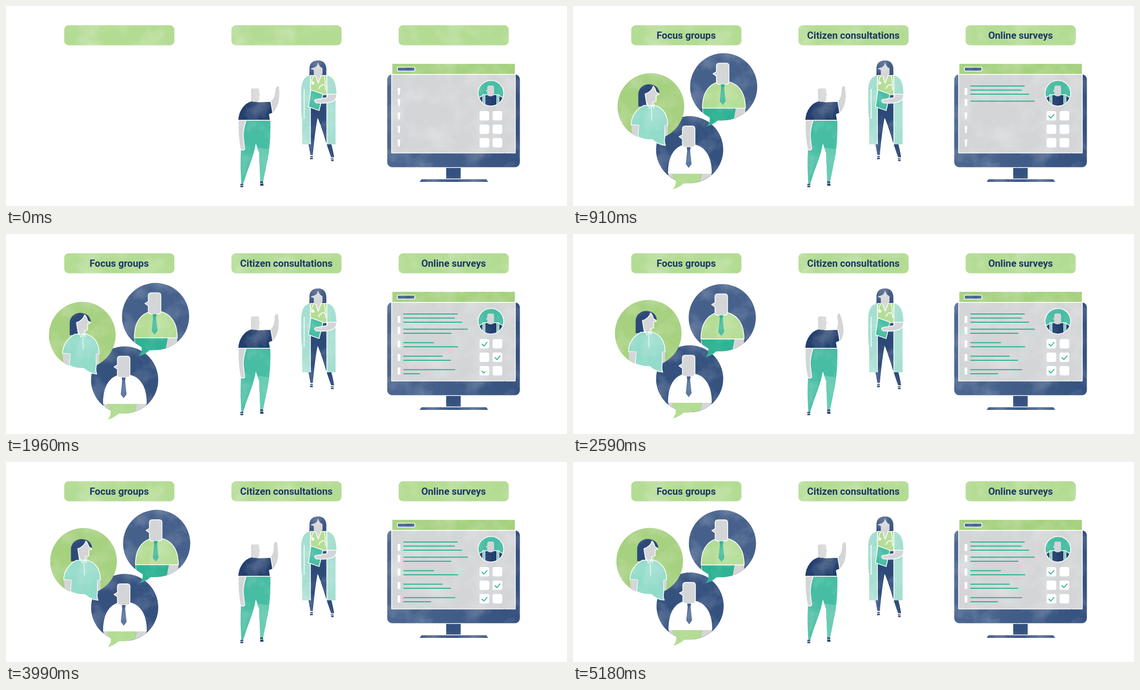
An HTML page that plays this animation: 1161 px wide and 415 px high, repeating every 5.25 s.

```html
<!DOCTYPE html>
<html lang="en">
<head>
<meta charset="utf-8">
<title>Ways to consult</title>
<style>
html, body { margin: 0; width: 100%; height: 100%; overflow: hidden; background: #fff; }
svg { display: block; width: 100vw; height: 100vh; }
text { font: 700 20.2px Roboto, sans-serif; fill: #1c3766; text-anchor: middle; }
.edge { stroke: #fff; stroke-width: 1.6; stroke-linejoin: round; }
.pen { fill: none; stroke: #fff; stroke-width: 1.6; }
.thin { stroke-width: 1.2; }
.navy { fill: #2d4978; } .slate { fill: #41608d; } .deep { fill: #233f6e; }
.teal { fill: #2fb394; } .sea { fill: #47bda3; } .mint { fill: #93dbca; } .pale { fill: #a5dfd1; }
.lime { fill: #b3dc93; } .leaf { fill: #a6d17f; } .grey { fill: #d4d5d7; } .white { fill: #fff; }
.ink { fill: none; stroke: #22b08f; stroke-width: 1.8; stroke-linecap: round; }
</style>
</head>
<body>
<svg viewBox="0 0 1161 415">
<defs>
  <!-- soft watercolour wash with slightly rough edges -->
  <filter id="paint" color-interpolation-filters="sRGB" x="-5%" y="-5%" width="110%" height="110%">
    <feTurbulence type="fractalNoise" baseFrequency=".02" numOctaves="5" seed="4"/>
    <feColorMatrix values="0 0 0 0 1  0 0 0 0 1  0 0 0 0 1  .6 0 0 0 -.25" result="wash"/>
    <feTurbulence type="fractalNoise" baseFrequency=".3" numOctaves="2" seed="9" result="rough"/>
    <feDisplacementMap in="SourceGraphic" in2="rough" scale="1.5" xChannelSelector="R" yChannelSelector="G" result="shape"/>
    <feComposite in="wash" in2="shape" operator="in"/>
    <feMerge><feMergeNode in="shape"/><feMergeNode/></feMerge>
  </filter>
  <clipPath id="round"><circle cx="1003.5" cy="181" r="26"/></clipPath>
  <linearGradient id="bezel" x2="1"><stop stop-color="#4c6790"/><stop offset="1" stop-color="#35517f"/></linearGradient>
</defs>

<g id="labels" filter="url(#paint)" class="lime"></g>
<g id="titles"></g>
<g id="bubbles"></g>

<!-- waving man -->
<path id="arm" class="grey" d="M545 199Q557 195 558 172Q561 164 565 168Q567 195 561 208Q556 219 549 224Z"/>
<g filter="url(#paint)">
  <path class="sea" d="M482 238H547C548 275 545 300 541 320L532 364H526C526 340 524 320 524 305L517 285C512 315 501 335 491 369H487C485 340 485 315 487 290Z"/>
  <path fill="#69ccb4" d="M520 294L544 297Q543 312 541 320L532 364H526C526 340 524 320 524 305Z"/>
  <path class="grey edge" d="M481 237H497Q491 255 491 270L494 297Q490 302 485 296Q479 265 481 237Z"/>
  <path class="deep edge" d="M480 237C481 215 494 201 508 197L523 199L548 198L552 222L545 225L547 237Z"/>
  <path class="grey" d="M507 175Q507 171 511 171H520Q524 171 524 175V182L527 184L524 186V197Q516 201 507 197Z"/>
  <path class="navy" d="M485 369h6v7h-6zM526 364h6l1 9h-7z"/>
  <path class="pen thin" d="M484 372.5h8M525 368h8"/>
</g>

<!-- doctor -->
<g filter="url(#paint)">
  <path class="navy" d="M628 150V130C628 118 636 113 646 113C657 113 663 120 663 132V150Z"/>
  <path class="navy" d="M628 182H665V240C666 270 675 285 679 314H673C662 285 655 255 645 232C641 250 637 285 635 309H630L626 287Z"/>
  <path class="navy" d="M630 311h5v7h-6zM672 316h6v6h-5z"/>
  <path class="pen thin" d="M628 314h9M670 318.5h10"/>
  <path class="lime edge" d="M630 144H664V184H630Z"/>
  <path class="grey" d="M611 178H617V225Q616 234 613 234Q610 230 611 178Z"/>
  <path class="pale" d="M613 287V234L611 190C610 160 614 147 630 144V287ZM664 144C678 147 683 158 684 182L682 196V287H664Z"/>
  <path class="pen" d="M630 144V287M664 144V287M617 172V234"/>
  <path class="grey edge" d="M640 142L646 160L653 142Z"/>
  <path class="grey" d="M636 128Q645 126 646 117Q648 126 655 129V141Q646 148 637 143V133L630 130Z"/>
  <path class="pen" d="M637 145Q630 155 635 160M658 145Q662 155 660 164M647 172Q652 161 659 164Q663 168 661 174"/>
  <circle class="white" cx="635" cy="160" r="3.2"/>
  <path class="sea edge" d="M631 174L656 183L648 217L626 209Z"/>
  <path class="grey edge" d="M684 183C685 196 676 204 642 201Q636 197 641 194L664 190L666 183Z"/>
</g>

<!-- computer -->
<g filter="url(#paint)">
  <rect x="789" y="142" width="274.5" height="192.5" rx="10" fill="url(#bezel)"/>
  <path fill="#35517f" d="M911 336h30v22h-30zM860 359.5H994L998 365H856Z"/>
  <path class="leaf" d="M799.5 120H1053V141H799.5Z"/>
  <rect class="slate edge" x="810" y="127" width="36" height="8" rx="2"/>
  <path class="grey edge" d="M798 142H1054V305H798Z"/>
  <g clip-path="url(#round)">
    <path class="sea" d="M977 154h54v54h-54z"/>
    <path class="deep edge" d="M978 209V191Q986 185 995 184H1012Q1022 185 1029 191V209Z"/>
    <path class="sea edge" d="M987 184h4v26h-4zM1016 184h4v26h-4z"/>
    <path class="grey" d="M996 169Q996 165 1000 165H1006Q1010 165 1010 169V185Q1003 190 996 185V178L992 176L996 174Z"/>
  </g>
  <circle class="pen" cx="1003.5" cy="181" r="26.5"/>
</g>
<g id="boxes" class="white"></g>
<g id="marks" class="white"></g>
<g id="lines" class="ink"></g>
<g id="ticks" class="ink"></g>
</svg>

<script>
const LOOP = 5250, STEP = 70;
const el = id => document.getElementById(id);
const clamp = v => Math.max(0, Math.min(1, v));
const fill = (id, list, make) => el(id).innerHTML = list.map(make).join("");

const titles = ["Focus groups", "Citizen consultations", "Online surveys"];
fill("labels", titles, (_, i) => `<rect x="${120.5 + 346 * i}" y="40" width="228" height="41.5" rx="9"/>`);
fill("titles", titles, (s, i) => `<text x="${234.3 + 346 * i}" y="68">${s}</text>`);

// figures are drawn around the centre of their speech bubble
const woman = `
  <circle class="leaf" r="69"/>
  <path class="navy" d="M-26 0V-24C-26 -38 -16 -46 -4 -46C8 -46 16 -40 18 -28L10 -30L-8 0Z"/>
  <path class="grey edge" d="M-12 -26Q1 -30 5 -42Q9 -38 11 -30L17 -25L11 -23V-11L4 -9V0H-8Z"/>
  <path class="mint edge" d="M-41 38Q-40 12 -15 -2H8Q34 5 35 38L29 40L29 64Q27 73 30 81Q14 79 3 69Q-13 70 -27 63L-25 39Z"/>
  <path class="grey" d="M-41 39H-25L-28 63L-39 57ZM29 39H35V59L30 62Z"/>
  <path class="pen thin" d="M-8 -8L-3 4L2 -3L6 3L7 -8M1 -2L2 30"/>`;

const man = (back, shirt, trousers, tie, waist, hip) => `
  <circle r="69.5" fill="${back}"/>
  <path class="grey" d="M25 ${waist}H45V53A69.5 69.5 0 0 1 21 66ZM-44 ${waist}H-36L-31 62L-44 54Z"/>
  <path class="${trousers}" d="M${hip} ${waist}H25L21 66Q5 71 -12 70Q-22 79 -35 82.5Q-27 73 -29 64L${hip + 1} 55Z"/>
  <path class="${shirt} edge" d="M-44 ${waist}C-44 5 -24 -11 0 -11S45 5 45 ${waist}Z"/>
  <path class="grey edge" d="M-15 -43q0 -6 6 -6h14q6 0 6 6V-11q0 6 -6 6H-9q-6 0 -6 -6V-22l-7 -5l7 -4Z"/>
  <path class="${tie}" d="M-6 -5H2L1 2L4 30L-2 38L-8 30L-5 2Z"/>`;

// each axis sways as [middle, reach, period, time of a peak]
const bubbles = [
  { start: 350, x: [243.5, 2.5, 2050, 1750], y: [300.4, 2.3, 2300, 2030],
    art: man("#35527f", "white", "lime", "slate", 49, -37) },
  { start: 70, x: [158.4, 2.8, 3400, 1000], y: [207.8, 2, 1300, 650],
    art: woman },
  { start: 210, x: [310.3, 1.5, 3100, 910], y: [170.5, 3, 3600, 2750],
    art: man("#45608b", "lime", "teal", "teal", 44.5, -43) }
];
fill("bubbles", bubbles, b => `<g><g filter="url(#paint)">${b.art}</g></g>`);
bubbles.forEach((b, i) => b.node = el("bubbles").children[i]);

const sway = ([mid, reach, period, peak], t) => mid + reach * Math.cos(2 * Math.PI * (t - peak) / period);

// survey: rows of lines, written one after another at a steady speed
const SPEED = 0.56, BEGIN = 75;
const rows = [[111, 105, 120], [132, 98], [62, 112], [80, 97], [106, 56]];
let total = 0;
const survey = rows.map((widths, i) => {
  const top = i ? 193 + 28 * (i - 1) : 170;
  return { top, from: total, lines: widths.map((w, k) => {
    total += w;
    return { y: top + (i ? 4.5 : -4) + 8.5 * k, w, from: total - w };
  }) };
});
const lines = survey.flatMap(row => row.lines);
const ticks = [0, 1, 2].map(i => ({ x: 990 + 27 * (i % 2), y: 228 + 28 * i, start: 750 + 570 * i }));

fill("boxes", [0, 1, 2, 3, 4, 5], i =>
  `<rect x="${980 + 27 * (i % 2)}" y="${218 + 28 * (i >> 1)}" width="20" height="19.5" rx="4"/>`);

function draw(t) {
  el("titles").setAttribute("opacity", clamp((t - 70) / 350));

  for (const b of bubbles) {
    const u = 1 - clamp((t - b.start) / 350);
    b.node.setAttribute("transform", `translate(${sway(b.x, t)} ${sway(b.y, t)}) scale(${1 - u * u})`);
    b.node.setAttribute("visibility", u < 1 ? "visible" : "hidden");
  }

  el("arm").setAttribute("transform", `rotate(${sway([-8, 8, 1050, 0], t)} 550 212)`);

  const written = (t - BEGIN) * SPEED;
  fill("lines", lines, ({ y, w, from }) => {
    const now = Math.min(w, written - from);
    return now > 0 ? `<path d="M823 ${y}h${now}"/>` : "";
  });
  fill("marks", survey, ({ top, from }) => {
    const taper = 1.3 * (1 - clamp((written - from) / 60));
    return `<path d="M810.5 ${top}h5.5l${-taper} 14.5h${2 * taper - 5.5}Z"/>`;
  });
  fill("ticks", ticks, ({ x, y, start }) => {
    const u = clamp((t - start) / 120);
    return u > 0 ? `<path pathLength="1" stroke-dasharray="${u} 2" d="M${x - 5} ${y + .5}l4 4l6.5 -7.5"/>` : "";
  });
}

const origin = performance.now();
let shown = -1;
function tick() {
  const t = Math.floor((performance.now() - origin) % LOOP / STEP) * STEP;
  if (t !== shown) draw(shown = t);
  requestAnimationFrame(tick);
}
tick();
</script>
</body>
</html>
```
